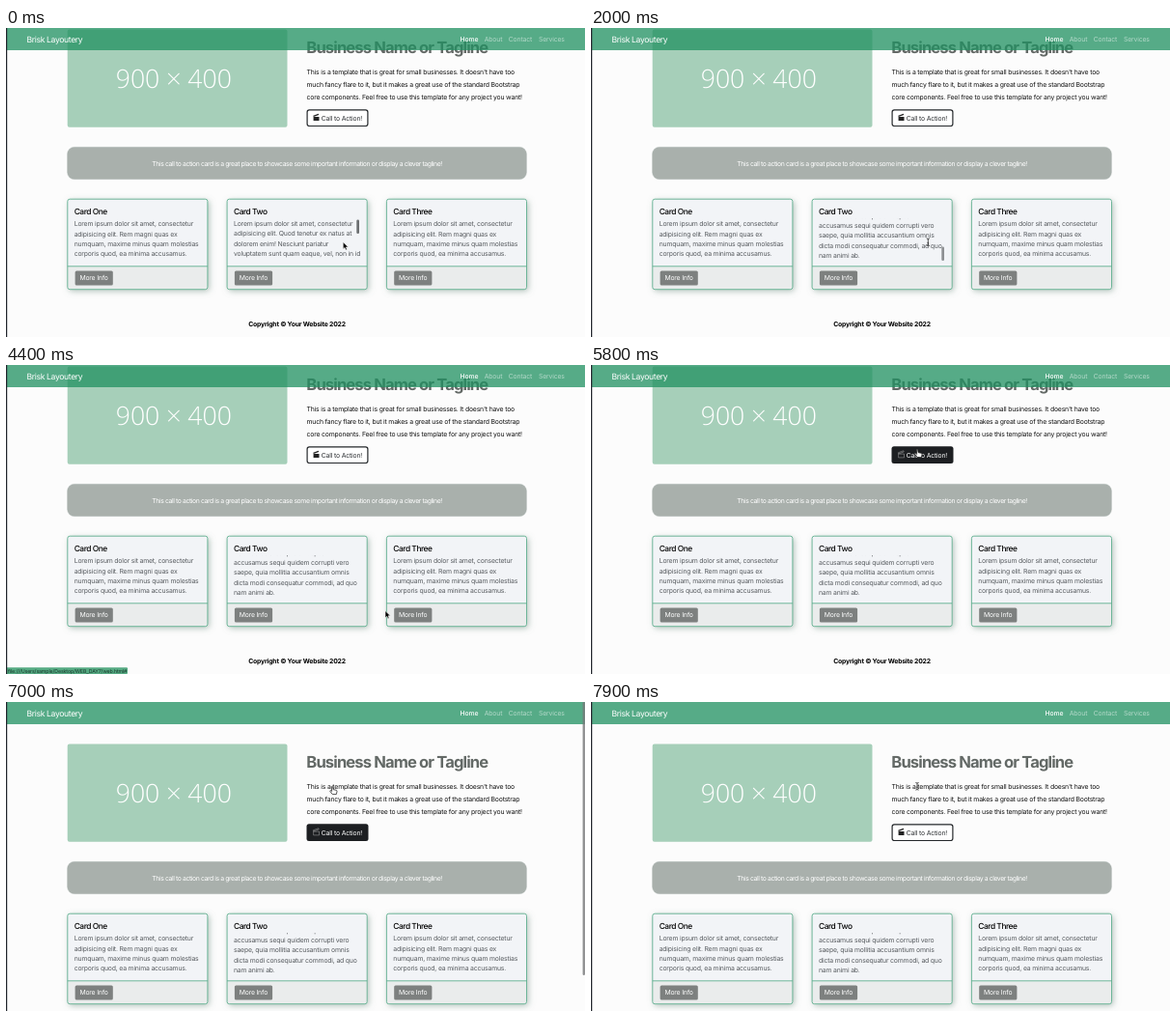
Animation of 600 by 320 pixels, one loop 8000 ms. Source, as an HTML page:

```html
<!DOCTYPE html>
<html lang="en">
<head>
<meta charset="utf-8">
<title>Business page walkthrough</title>
<style>
  html, body { margin: 0; width: 100%; height: 100%; overflow: hidden; background: #fcfcfc; }
  svg { display: block; width: 600px; height: 320px; }
  text { font: 400 6.86px Inter, "Open Sans", sans-serif; letter-spacing: -.027em; text-rendering: geometricPrecision; }
  .brand { font-size: 8.58px; letter-spacing: -.04em; fill: #fff; }
  .link { fill: #fff; fill-opacity: .55; }
  .active { font-weight: 500; fill-opacity: 1; }
  .size { font: 300 26.6px "Open Sans", sans-serif; letter-spacing: 0; fill: #fff; }
  .headline { font-size: 16.6px; font-weight: 700; letter-spacing: -.053em; fill: #636966; }
  .lead { fill: #111; }
  .banner { letter-spacing: -.06em; fill: #fff; }
  .title { font-size: 8.4px; font-weight: 500; letter-spacing: -.055em; fill: #050505; }
  .copy { fill: #575b5f; }
  .label { fill: #fff; }
  .footer { font-weight: 700; letter-spacing: -.031em; fill: #000; }
  .status { font-size: 5.3px; fill: #17352a; }
</style>
</head>
<body>
<svg id="stage" viewBox="0 0 600 320" xmlns="http://www.w3.org/2000/svg"></svg>
<script>
const LOOP = 8000, STEP = 100;
const NAV_HEIGHT = 23, MAX_SCROLL = 42;
const LINE = 10.25;

const lorem = [
  'Lorem ipsum dolor sit amet, consectetur',
  'adipisicing elit. Rem magni quas ex',
  'numquam, maxime minus quam molestias',
  'corporis quod, ea minima accusamus.'
];
const longLorem = [
  'Lorem ipsum dolor sit amet, consectetur',
  'adipisicing elit. Quod tenetur ex natus at',
  'dolorem enim! Nesciunt pariatur',
  'voluptatem sunt quam eaque, vel, non in id',
  'dolore voluptates quos eligendi labore.',
  'Lorem ipsum dolor sit amet, consectetur',
  'adipisicing elit. Impedit, magni. Nisi',
  'illo unde dolores quia sint optio',
  'accusamus sequi quidem corrupti vero',
  'saepe, quia mollitia accusantium omnis',
  'dicta modi consequatur commodi, ad quo',
  'nam animi ab.'
];
const leadText = [
  'This is a template that is great for small businesses. It doesn\'t have too',
  'much fancy flare to it, but it makes a great use of the standard Bootstrap',
  'core components. Feel free to use this template for any project you want!'
];

const text = (cls, x, y, str, extra = '') => `<text class="${cls}" x="${x}" y="${y}" ${extra}>${str}</text>`;
const rect = (x, y, w, h, r, fill, extra = '') =>
  `<rect x="${x}" y="${y}" width="${w}" height="${h}" rx="${r}" fill="${fill}" ${extra}/>`;
const lines = (cls, x, y, step, list) => list.map((s, i) => text(cls, x, y + i * step, s)).join('');
const centered = 'text-anchor="middle"';

function card(i, name) {
  const x = 63.8 + i * 165.3, textX = x + 6.9;
  const copy = i === 1
    ? `<g clip-path="url(#copyClip)"><g id="copy">${lines('copy', textX, 247, LINE, longLorem)}</g></g>
       ${rect(363.3, 240.5, 2.7, 14.5, 1.35, '#6c6f71', 'id="copyThumb"')}`
    : lines('copy', textX, 247.4, LINE, lorem);
  return `<g filter="url(#shadow)">${rect(x, 219.2, 145.1, 93.5, 2.3, '#f2f4f7')}</g>
    <path d="M${x} 288.8h145.1v21.9q0 2-2 2h-141.1q-2 0-2-2z" fill="#eaecec"/>
    ${rect(x, 219.2, 145.1, 93.5, 2.3, 'none', 'stroke="#4fa883" stroke-width=".8"')}
    <path d="M${x} 288.8h145.1" stroke="#4fa883" stroke-width=".8"/>
    ${text('title', textX, 234.7, name)}
    ${copy}
    ${rect(x + 7.8, 293.4, 39.2, 15, 1.5, '#7d807f', `id="more${i}"`)}
    ${rect(x + 7, 292.3, 41, 17.1, 2.3, '#33363a', `id="moreHover${i}"`)}
    ${text('label', x + 12.6, 303.4, 'More Info')}`;
}

const clapper = `<path d="M318.6 134.1h5.9v3.8h-5.9z M318.3 132.8l5.5-2 .4 1.1-5.5 2z"`;
const hero = `
  ${rect(63.7, 43.5, 227.8, 101.2, 2, '#a6cfb9')}
  ${text('size', 173.8, 104, '900 × 400', centered)}
  ${text('headline', 311.3, 67.9, 'Business Name or Tagline')}
  ${lines('lead', 311.5, 90.4, 12.65, leadText)}
  <g id="cta">${rect(312.1, 126.9, 62.8, 16.6, 2.2, '#fff', 'stroke="#25282b" stroke-width="1.2"')}
    ${clapper} fill="#222"/>${text('', 326.8, 137.8, 'Call to Action!', 'fill="#2c2f32"')}</g>
  <g id="ctaHover">${rect(311.5, 126.3, 64, 17.8, 2.5, '#1d1f22')}
    ${clapper} fill="none" stroke="#ccc" stroke-width=".4"/>${text('label', 326.8, 137.8, 'Call to Action!')}</g>
  ${rect(63.7, 165.4, 475.6, 33.2, 7, '#a9b0ac', 'stroke="#9fa9a4" stroke-width=".5"')}
  ${text('banner', 301.6, 184.6, 'This call to action card is a great place to showcase some important information or display a clever tagline!', centered)}`;

const nav = `
  ${rect(0, 0, 600, NAV_HEIGHT, 0, '#1f9060', 'fill-opacity=".75"')}
  ${text('brand', 21.5, 14.9, 'Brisk Layoutery')}
  ${text('link active', 470.6, 14.2, 'Home')}
  ${text('link', 495.8, 14.2, 'About')}
  ${text('link', 520.8, 14.2, 'Contact')}
  ${text('link', 552, 14.2, 'Services')}`;

const pointers = `
  <path id="arrow" d="M0 0v7.2l1.7-1.5 1.1 2.5 1.3-.6-1.1-2.4h2.3z" fill="#000" stroke="#fff" stroke-width=".55"/>
  <path id="ibeam" d="M-1.6-3.8Q0-3.8 0-2.8Q0-3.8 1.6-3.8M0-2.8v5.6M-1.6 3.8Q0 3.8 0 2.8Q0 3.8 1.6 3.8M-.8.9h1.6" fill="none" stroke="#222" stroke-width=".8"/>
  <path id="hand" d="M-.7.5Q0-.5.7.5l.3 2.8 3.2.7q1 .4.8 1.5l-.7 2.8h-3.9l-2.6-3.2q0-1 1-.7l.9.7z" fill="#fff" stroke="#111" stroke-width=".7"/>`;

const stage = document.getElementById('stage');
stage.innerHTML = `
  <defs>
    <filter id="shadow" x="-12%" y="-15%" width="130%" height="140%">
      <feDropShadow dx="1.7" dy="1.7" stdDeviation="3.4" flood-color="#6f8f82" flood-opacity=".55"/>
    </filter>
    <clipPath id="copyClip">${rect(235, 239, 135, 43.4, 0, '#000')}</clipPath>
  </defs>
  ${rect(0, 0, 600, 320, 0, '#fcfcfc')}
  <g id="page">${hero}${['One', 'Two', 'Three'].map((n, i) => card(i, 'Card ' + n)).join('')}
    ${text('footer', 301.5, 350.9, 'Copyright © Your Website 2022', centered)}</g>
  ${nav}
  ${rect(597.6, 0, 2.4, 283, 1.2, '#77797a', 'id="pageThumb"')}
  <g id="status">${rect(0, 313.2, 126, 6.8, 1, '#56ab83')}
    ${text('status', 2, 318.6, 'file:///Users/sample/Desktop/WEB_DAY7/web.html#')}</g>
  ${rect(0, 0, 1.2, 320, 0, '#20242b')}
  <g id="pointer">${pointers}</g>`;

const el = {};
stage.querySelectorAll('[id]').forEach(node => el[node.id] = node);

// Smoothly interpolates between [time, value] keys.
function track(t, keys) {
  const next = keys.findIndex(k => k[0] > t);
  if (next === 0) return keys[0][1];
  if (next < 0) return keys[keys.length - 1][1];
  const [t0, a] = keys[next - 1], [t1, b] = keys[next];
  const u = (t - t0) / (t1 - t0);
  return a + (b - a) * u * u * (3 - 2 * u);
}
const during = (t, from, to) => t >= from && t < to;
const show = (node, on) => node.setAttribute('visibility', on ? 'visible' : 'hidden');
const move = (node, x, y) => node.setAttribute('transform', `translate(${x.toFixed(2)} ${y.toFixed(2)})`);

const copyScroll = [[0, 0], [500, 24], [1000, 24], [1100, 25], [2000, 80]];
const pageScroll = [[5900, MAX_SCROLL], [6600, 0]];
const pointerX = [[0, 349.3], [2000, 349.3], [2700, 241.8], [3900, 241.8], [4400, 393], [4600, 414], [5000, 414], [5600, 338]];
const pointerY = [[0, 221.7], [2000, 221.7], [2700, 256.3], [3900, 256.3], [4400, 254.6], [4600, 256], [5000, 256], [5600, 87.3]];
const pointerKinds = [[0, 'arrow'], [800, 'ibeam'], [2100, 'arrow'], [2700, 'hand'], [4000, 'arrow'],
  [4500, 'hand'], [5100, 'arrow'], [5500, 'hand'], [7400, 'ibeam']];
const moreHover = [null, [2700, 4000], [4500, 5100]];

function render(t) {
  move(el.page, 0, -track(t, pageScroll));
  el.pageThumb.setAttribute('opacity', track(t, [[5900, 0], [6000, .8], [7300, .8], [7700, 0]]));

  const scrolled = track(t, copyScroll);
  move(el.copy, 0, -scrolled);
  move(el.copyThumb, 0, scrolled * .35);
  el.copyThumb.setAttribute('opacity', track(t, [[0, 1], [500, 1], [1100, .75], [2100, .75], [2500, 0]]));

  moreHover.forEach((span, i) => {
    const on = !!span && during(t, ...span);
    show(el['more' + i], !on);
    show(el['moreHover' + i], on);
  });
  const ctaOn = during(t, 5500, 7400);
  show(el.cta, !ctaOn);
  show(el.ctaHover, ctaOn);
  show(el.status, during(t, 2800, 5400));

  move(el.pointer, track(t, pointerX), track(t, pointerY));
  const kind = pointerKinds.filter(k => k[0] <= t).pop()[1];
  for (const name of ['arrow', 'ibeam', 'hand']) show(el[name], name === kind);
}

const start = performance.now();
function tick() {
  const t = (performance.now() - start) % LOOP;
  render(Math.floor(t / STEP) * STEP);
  requestAnimationFrame(tick);
}
tick();
</script>
</body>
</html>
```
